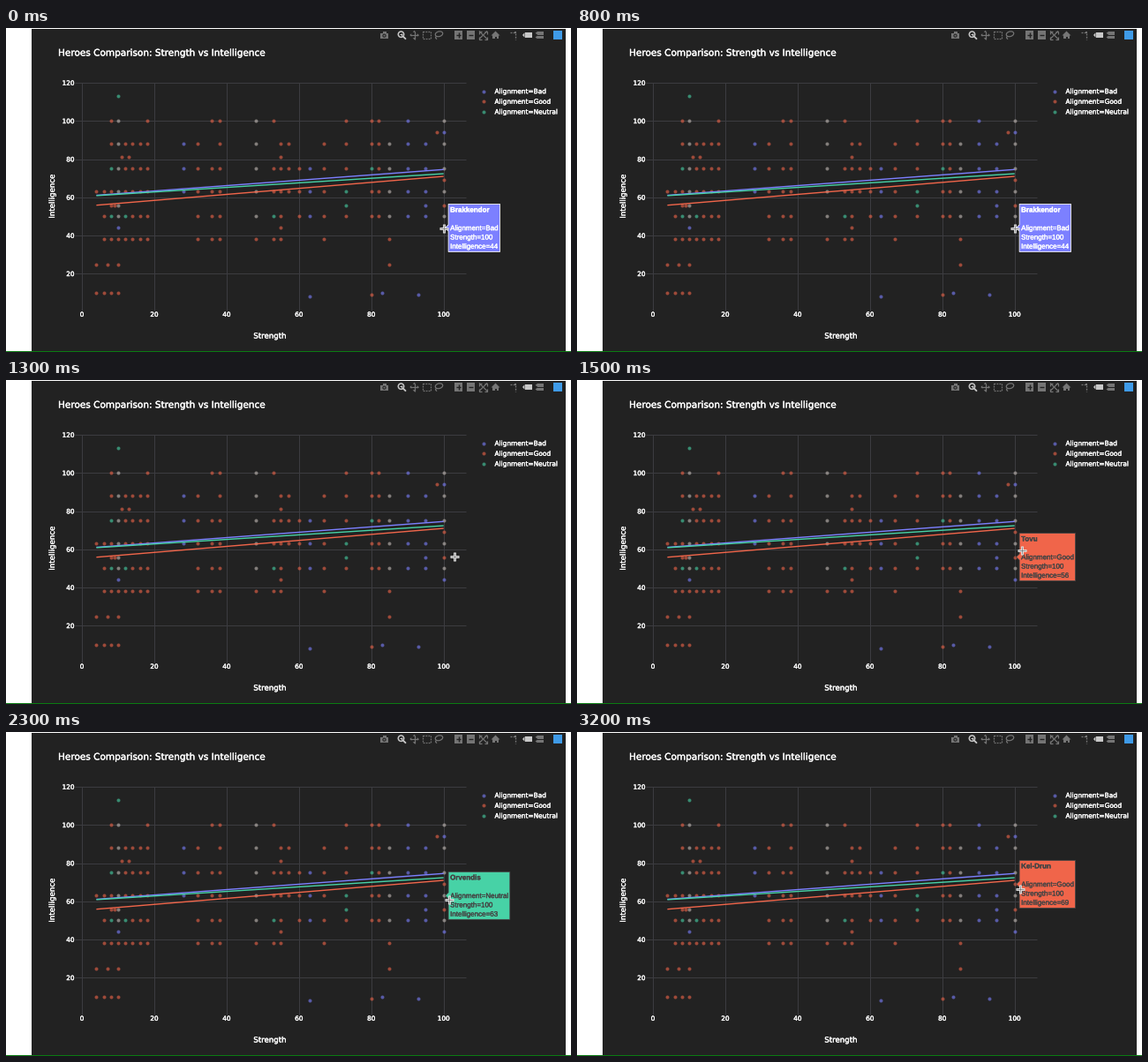
Write a matplotlib script that moves like this. It is 640 px wide and 367 px high and loops after 3300 ms.

```python
import random

import numpy as np
import matplotlib.pyplot as plt
from matplotlib import patheffects
from matplotlib.animation import FuncAnimation
from matplotlib.patches import Circle, Ellipse, Polygon, Rectangle

W, H, DPI = 640, 367, 100
FRAMES, STEP = 33, 100
PX = 72 / DPI  # points per pixel

BG, GRID, INK, DARK = "#222222", "#3c3c40", "#ffffff", "#444444"
BLUE, RED, TEAL, PALE = "#7c80ff", "#f0654a", "#47d2a6", "#c4bcb8"
ICON, ACTIVE = "#757575", "#c8c8c8"

fig = plt.figure(figsize=(W / DPI, H / DPI), dpi=DPI, facecolor="white")
ax = fig.add_axes([0, 0, 1, 1])
ax.set_xlim(0.5, W + 0.5)
ax.set_ylim(H + 0.5, 0.5)
ax.axis("off")


def sx(v):
    return 86.5 + 4.097 * np.asarray(v, float)


def sy(v):
    return 322.1 - 2.1625 * np.asarray(v, float)


def line(xs, ys, color, width=1.0, **kw):
    return ax.plot(xs, ys, color=color, lw=width * PX,
                   solid_capstyle="butt", **kw)[0]


def rect(x, y, w, h, color, fill=True, width=1.0, **kw):
    face = color if fill else "none"
    edge = "none" if fill else color
    return ax.add_patch(Rectangle((x, y), w, h, fc=face, ec=edge,
                                  lw=width * PX, **kw))


def shape(points, color, **kw):
    return ax.add_patch(Polygon(points, fc=color, **{"ec": "none", **kw}))


def label(x, y, text, size, font="DejaVu Sans", color=INK, **kw):
    bolder = patheffects.withStroke(linewidth=0.22, foreground=color)
    return ax.text(x, y, text, fontsize=size * PX, family=font,
                   color=color, path_effects=[bolder], **kw)


def dots(xs, ys, color):
    ax.scatter(xs, ys, s=(4 * PX) ** 2, c=color, alpha=0.6,
               linewidths=0, zorder=3)


def toolbar(y=8.5):
    # camera
    rect(424.5, 6, 9, 6.5, ICON)
    rect(427, 4.6, 4, 2, ICON)
    ax.add_patch(Circle((429, 9.2), 2.1, fc=BG, ec="none"))
    ax.add_patch(Circle((429, 9.2), 1, fc=ICON, ec="none"))
    # zoom
    ax.add_patch(Circle((448, 7.7), 3.2, fc="none", ec=ACTIVE, lw=1.5 * PX))
    line([450.3, 453.5], [10, 13.2], ACTIVE, 1.8)
    line([446.5, 449.5], [7.7, 7.7], ACTIVE)
    line([448, 448], [6.2, 9.2], ACTIVE)
    # pan
    line([458.5, 467.5], [y, y], ICON, 1.2)
    line([463, 463], [4, 13], ICON, 1.2)
    for dx, dy in ((1, 0), (-1, 0), (0, 1), (0, -1)):
        tip = np.array([463 + 5.2 * dx, y + 5.2 * dy])
        base = tip - 2 * np.array([dx, dy])
        side = 1.8 * np.array([dy, dx])
        shape([tip, base + side, base - side], ICON)
    # box and lasso select
    rect(472.8, 4.4, 8.6, 8.4, ICON, False, 1.2, ls=(0, (1.5, 1)))
    ax.add_patch(Ellipse((491, 7.3), 8.6, 5.6, angle=-15, fc="none",
                         ec=ICON, lw=1.2 * PX))
    line([488, 487, 488.5], [9.5, 11.5, 13.2], ICON, 1.2)
    # zoom in and out
    for x in (513, 527):
        rect(x - 4.6, y - 4.6, 9.2, 9.2, ICON)
        line([x - 2.8, x + 2.8], [y, y], BG, 1.4)
    line([513, 513], [y - 2.8, y + 2.8], BG, 1.4)
    # autoscale
    for dx in (-1, 1):
        for dy in (-1, 1):
            cx, cy = 541 + 4.5 * dx, y + 4.5 * dy
            line([cx - 3 * dx, cx, cx], [cy, cy, cy - 3 * dy], ICON, 1.2)
            line([541, cx], [y, cy], ICON, 1.2)
    # home
    shape([(550, 9), (555, 4), (560, 9)], ICON)
    rect(551.4, 8.8, 7.2, 4, ICON)
    rect(554, 10, 2, 3, BG)
    # spike lines and hover tags
    line([571, 577], [5.5, 5.5], ICON, 1.3, ls=(0, (1.5, 1)))
    line([577.5, 577.5], [6, 13], ICON, 1.3, ls=(0, (1.5, 1)))
    rect(576.3, 4.3, 2.5, 2.5, ICON)
    for x, cy, w, h, color in ((585.5, y, 10.5, 5.6, ACTIVE),
                               (600, 6.3, 9.5, 3.6, ICON),
                               (600, 11, 9.5, 3.6, ICON)):
        rect(x + 2.5, cy - h / 2, w - 2.5, h, color)
        shape([(x, cy), (x + 2.5, cy - h / 2), (x + 2.5, cy + h / 2)], color)
    rect(620.8, 3.8, 9.4, 9.6, "#3f9be8")


def axes_and_legend():
    for v in range(0, 101, 20):
        line([sx(v)] * 2, [62, 320], GRID, zorder=1)
        label(sx(v), 327.4, str(v), 7.3, ha="center")
    for v in range(20, 121, 20):
        line([78, 521], [sy(v)] * 2, GRID, zorder=1)
        label(78, sy(v) + 2.7, str(v), 7.3, ha="right")
    label(59.5, 32, "Heroes Comparison: Strength vs Intelligence", 10.5)
    label(299.5, 352, "Strength", 8.6, ha="center")
    label(53, 191, "Intelligence", 8.6, rotation=90, ha="center", va="center")
    for k, (name, color) in enumerate((("Bad", BLUE), ("Good", RED),
                                       ("Neutral", TEAL))):
        y = 72 + 11.6 * k
        dots([541.5], [y], color)
        label(554, y + 2.7, f"Alignment={name}", 7.4)


COMMON = [18, 28, 32, 36, 38, 48, 53, 55, 57, 60, 63, 67, 73,
          80, 82, 85, 90, 95, 100]
CROWDED = {10, 48, 85, 100}
VILLAINS = {28, 63, 90, 95}
# intelligence, range of weak heroes, share of the common strengths
LEVELS = [
    (100, range(8, 11, 2), 0.5), (88, range(8, 17, 2), 0.8),
    (81, range(11, 14, 2), 0.1), (75, range(8, 17, 2), 1),
    (63, range(4, 17, 2), 1), (56, range(8, 11), 0.1),
    (50, range(6, 17, 2), 0.9), (38, range(6, 17, 2), 0.45),
    (25, range(4, 11, 3), 0.1), (10, range(4, 11, 2), 0),
]
OUTLIERS = {
    BLUE: [(63, 8), (83, 10), (93, 9), (10, 44), (100, 44), (100, 94)],
    RED: [(80, 9), (55, 44), (98, 94), (100, 69), (100, 56)],
    TEAL: [(10, 113), (73, 56)],
}


def scatter_heroes():
    rng = random.Random(12)
    groups = {color: list(pts) for color, pts in OUTLIERS.items()}
    groups[PALE] = []
    for level, weak, share in LEVELS:
        strong = [s for s in COMMON
                  if rng.random() < share * (1.6 if s in CROWDED else 1)]
        for s in [*weak, *strong]:
            if s in CROWDED and level > 40:
                color = PALE
            elif s in VILLAINS:
                color = BLUE
            elif 50 <= level <= 75 and rng.random() < 0.15:
                color = TEAL
            else:
                color = RED
            groups[color].append((s, level))
    for color, pts in groups.items():
        xs, ys = zip(*pts)
        dots(sx(xs), sy(ys), color)


def trends():
    for ends, color in (((61.1, 74.6), BLUE), ((55.9, 71), RED),
                        ((60.9, 72.4), TEAL)):
        line(sx([4, 100]), sy(ends), color, 1.4, zorder=4)


def hover(name, side, value, color, right, ink, edge):
    cy, left = float(sy(value)), 501.6
    outline = [(498, cy), (left, cy - 3.5), (left, cy - 27), (right, cy - 27),
               (right, cy + 27), (left, cy + 27), (left, cy + 3.5)]
    parts = [shape(outline, color, ec=edge, lw=0.8 * PX, zorder=6)]
    rows = [name, "", f"Alignment={side}", "Strength=100",
            f"Intelligence={value}"]
    for k, text in enumerate(rows):
        parts.append(label(503.6, cy - 18 + 10.35 * k, text, 8,
                           "Liberation Sans", ink, zorder=7,
                           weight="normal" if k else "bold"))
    return parts


rect(29.5, 1.5, 605, 364.5, BG, zorder=0)
rect(0, 366, W + 1, 2, "#0b7a12", zorder=0)
toolbar()
axes_and_legend()
scatter_heroes()
trends()

# Each box stays until the next entry starts
HOVERS = [
    (0, hover("Brakkendor", "Bad", 44, BLUE, 560, "white", "white")),
    (1300, []),
    (1500, hover("Tovu", "Good", 56, RED, 565, DARK, DARK)),
    (1900, hover("Orvendis", "Neutral", 63, TEAL, 571.3, DARK, DARK)),
    (2700, hover("Kel-Drun", "Good", 69, RED, 565, DARK, DARK)),
]

cross = [ax.plot([], [], "+", ms=size * PX, mew=width * PX, color=color,
                 zorder=9)[0]
         for size, width, color in ((10, 2.8, "#e4e4e4"), (8, 0.7, "#777777"))]

# Pointer stops: time, x, y
PATH = np.array([(0, 496.5, 227), (1100, 496.5, 227), (1300, 508, 200),
                 (1500, 504, 193), (1900, 502, 190.5), (2400, 502, 190.5),
                 (2700, 502, 178.5)])


def update(i):
    t = i * STEP
    current = max(k for k, (start, _) in enumerate(HOVERS) if start <= t)
    for k, (_, parts) in enumerate(HOVERS):
        for part in parts:
            part.set_visible(k == current)
    x, y = (np.interp(t, PATH[:, 0], PATH[:, c]) for c in (1, 2))
    for mark in cross:
        mark.set_data([x], [y])
    return cross


anim = FuncAnimation(fig, update, frames=FRAMES, interval=STEP,
                     init_func=lambda: update(0), repeat=True,
                     repeat_delay=0, blit=False)
plt.show()
```
